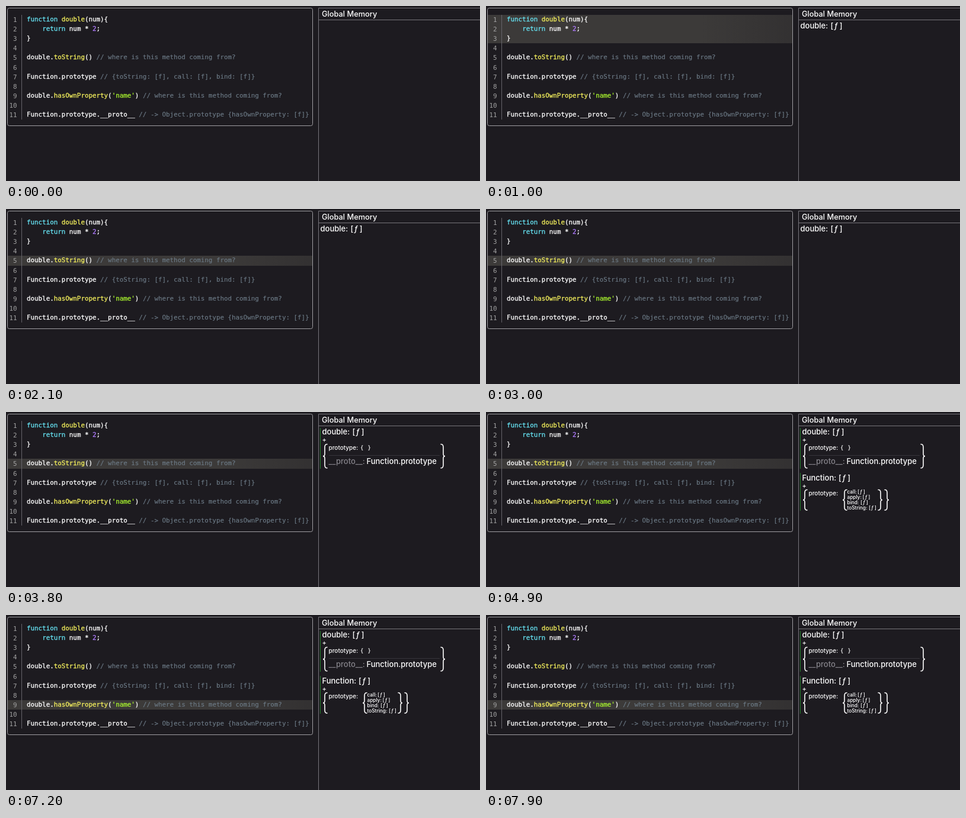
Write an HTML page that moves like this. It is 800 by 296 pixels and loops after 8000 ms.

```html
<!DOCTYPE html>
<html lang="en">
<head>
<meta charset="utf-8">
<style>
  html, body { margin: 0; width: 100%; height: 100%; overflow: hidden; background: #1d1b20; }
  svg { display: block; width: 100vw; height: 100vh; }
  text { white-space: pre; fill: currentColor; color: #fff; }
  tspan { fill: currentColor; stroke: currentColor; stroke-width: .3; }
  .code text { font: 10.85px "DejaVu Sans Mono", monospace; }
  .code .number { color: #a3a3a3; text-anchor: end; }
  .keyword { color: #66e2f2; }
  .func { color: #f3ef5c; }
  .num { color: #b07cff; }
  .string { color: #a9f52e; }
  .comment { color: #6c7a86; stroke-width: .15; }
  .memory text { font-family: Inter, sans-serif; font-weight: 500; }
  .memory .dim { color: #85838a; }
  .lit .mark { color: #2dfb2d; }
  .frame { fill: none; stroke: #a09fa3; }
  .brace { fill: none; stroke: #fff; stroke-width: 1.6; stroke-linecap: round; }
  .scope { stroke: #21812a; }
  .rule { stroke: #37353b; }
  .f { font-style: italic; }
</style>
</head>
<body>
<svg viewBox="0 0 800 296">
  <defs>
    <linearGradient id="fade">
      <stop offset=".7" stop-color="#3c3a39"/>
      <stop offset="1" stop-color="#3c3a39" stop-opacity=".7"/>
    </linearGradient>
  </defs>
  <rect id="highlight" x="3" width="515" fill="url(#fade)"/>
  <g class="frame">
    <rect x="2.5" y="3.5" width="515" height="199" rx="3"/>
    <path d="M26.5 15V192" stroke="#66646a"/>
    <path d="M527.5 296V3.5H800M527.5 23.5H800" stroke="#77757b"/>
  </g>
  <g class="code" id="code"></g>
  <g class="memory" id="memory"></g>
</svg>
<script>
const LOOP = 8000, LINE = 16.1;

// Each token is [text, class].
const source = [
  [['function', 'keyword'], [' '], ['double', 'func'], ['(num){']],
  [['    '], ['return', 'keyword'], [' num * '], ['2', 'num'], [';']],
  [['}']],
  [],
  [['double.'], ['toString', 'func'], ['() '], ['// where is this method coming from?', 'comment']],
  [],
  [['Function.prototype '], ['// {toString: [f], call: [f], bind: [f]}', 'comment']],
  [],
  [['double.'], ['hasOwnProperty', 'func'], ['('], ["'name'", 'string'], [') '],
    ['// where is this method coming from?', 'comment']],
  [],
  [['Function.prototype.__proto__ '], ['// -> Object.prototype {hasOwnProperty: [f]}', 'comment']]
];

// lines: first and last highlighted line; depth: how many memory parts are open.
const scenes = [
  { at: 0, depth: 0 },
  { at: 1000, lines: [1, 3], depth: 1 },
  { at: 2100, lines: [5, 5], depth: 1 },
  { at: 3200, lines: [5, 5], depth: 2 },
  { at: 4200, lines: [5, 5], depth: 3 },
  { at: 5900, lines: [7, 7], depth: 3, lit: true },
  { at: 7100, lines: [9, 9], depth: 3 }
];

function add(parent, tag, attrs, content = '') {
  const node = document.createElementNS('http://www.w3.org/2000/svg', tag);
  for (const key in attrs) node.setAttribute(key, attrs[key]);
  node.textContent = content;
  return parent.appendChild(node);
}

const label = (parent, x, y, size, content, cls = '') =>
  add(parent, 'text', { x, y, 'font-size': size, class: cls }, content);

const path = (parent, d, cls) => add(parent, 'path', { d, class: cls });

// A curly brace with its open end at x; dir is 1 for "{" and -1 for "}".
function brace(parent, x, top, bottom, dir) {
  const mid = (top + bottom) / 2, spine = x - 4 * dir, tip = x - 7 * dir;
  path(parent, `M${x} ${top}Q${spine} ${top} ${spine} ${top + 5}V${mid - 4}
    Q${spine} ${mid} ${tip} ${mid}Q${spine} ${mid} ${spine} ${mid + 4}V${bottom - 5}
    Q${spine} ${bottom} ${x} ${bottom}`, 'brace');
}

function functionMark(parent, x, y, size) {
  const gap = size * .5;
  label(parent, x, y, size, '[');
  label(parent, x + gap, y, size, 'ƒ', 'f');
  label(parent, x + gap * 2.35, y, size, ']');
}

const code = document.getElementById('code');
source.forEach((tokens, i) => {
  const y = 26 + i * LINE;
  label(code, 18.5, y + 1, 11, i + 1, 'number');
  const row = add(code, 'text', { x: 35, y });
  for (const [content, cls = ''] of tokens) add(row, 'tspan', { class: cls }, content);
});

const memory = document.getElementById('memory');
label(memory, 533, 18.3, 12.8, 'Global Memory');

const name = add(memory, 'g');
label(name, 533.5, 38, 13, 'double:', 'mark');
functionMark(name, 584.5, 38, 13);

const own = add(memory, 'g');
path(own, 'M530.5 27V96', 'scope');
label(own, 533.5, 51, 11, '+');
brace(own, 542, 54.5, 94.8, 1);
label(own, 544.5, 64, 10, 'prototype:');
label(own, 598.5, 64, 10, '{');
label(own, 611, 64, 10, '}');
path(own, 'M545 73.5H732', 'rule');
label(own, 544.5, 88, 13, '__proto__:', 'dim');
label(own, 608.5, 88, 13, 'Function.prototype', 'mark');
brace(own, 734, 54.5, 94.8, -1);

const parent = add(memory, 'g');
path(parent, 'M530.5 103V167', 'scope');
label(parent, 533.5, 115.5, 13, 'Function:');
functionMark(parent, 595, 115.5, 13);
label(parent, 533.5, 129, 11, '+');
brace(parent, 542, 131.5, 166, 1);
label(parent, 544.5, 141.3, 10, 'prototype:', 'mark');
brace(parent, 609, 131.5, 166, 1);
[['call:', 627], ['apply:', 635.5], ['bind:', 632], ['toString:', 646]].forEach(([key, x], i) => {
  const y = 138.2 + i * 8.9;
  label(parent, 609.5, y, 8.3, key, i === 3 ? 'mark' : '');
  functionMark(parent, x, y, 8.3);
});
brace(parent, 662, 131.5, 166, -1);
brace(parent, 673, 131.5, 166, -1);

const highlight = document.getElementById('highlight');
const show = (node, on) => node.setAttribute('visibility', on ? 'visible' : 'hidden');
const lineTop = line => Math.round(15 + (line - 1) * LINE);

function render(now) {
  const time = now % LOOP;
  const { lines, depth, lit = false } = scenes.findLast(scene => scene.at <= time);
  show(highlight, lines);
  if (lines) {
    const top = lineTop(lines[0]);
    highlight.setAttribute('y', top);
    highlight.setAttribute('height', lineTop(lines[1] + 1) - top);
  }
  [name, own, parent].forEach((part, i) => show(part, depth > i));
  // The name sits flush left until its scope bar appears.
  name.setAttribute('transform', `translate(${depth > 1 ? 0 : -3} 0)`);
  memory.classList.toggle('lit', lit);
}

const start = performance.now();
function tick() {
  render(performance.now() - start);
  requestAnimationFrame(tick);
}
tick();
</script>
</body>
</html>
```
